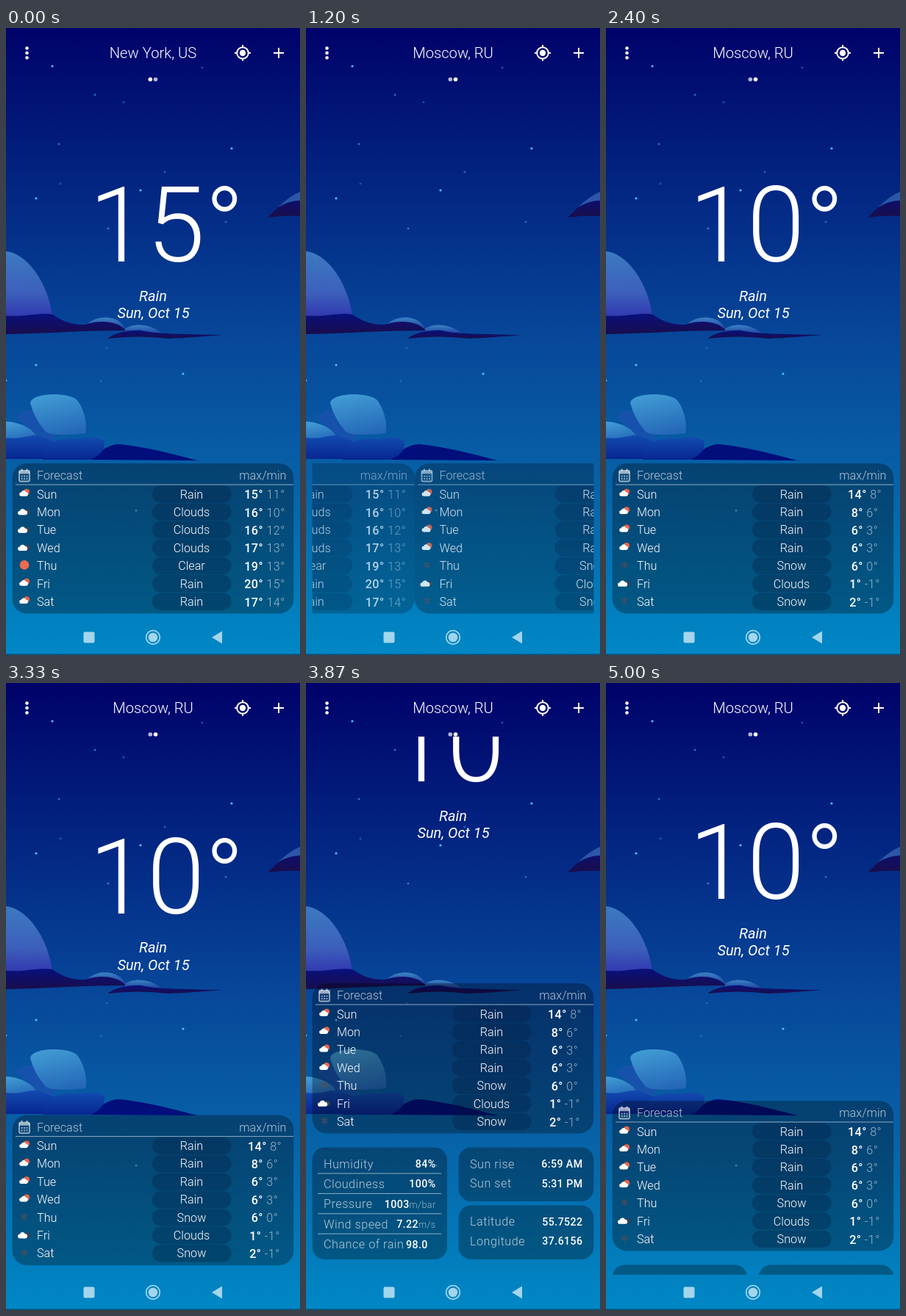
Write an HTML page that moves like this. It is 400 px wide and 854 px high and loops after 5.27 s.

```html
<!DOCTYPE html>
<html lang="en">
<head>
<meta charset="utf-8">
<title>Weather</title>
<style>
  html, body { margin: 0; width: 100%; height: 100%; overflow: hidden; background: #00026a; }
  svg { display: block; width: 400px; height: 854px; }
  text { font: 300 16.2px Roboto, sans-serif; fill: #fff; white-space: pre; }
  .mid { text-anchor: middle; }
  .end { text-anchor: end; }
  .soft { fill-opacity: .7; }
  .dim { font-weight: 300; fill-opacity: .6; }
  .title { font-size: 20.2px; }
  .temp { font-size: 142px; }
  .note { font-size: 20px; font-weight: 400; font-style: italic; }
  .range { font-weight: 500; letter-spacing: .4px; }
  .label { letter-spacing: .5px; fill-opacity: .7; }
  .value { font-size: 14.2px; font-weight: 500; letter-spacing: .4px; }
  .unit { font-size: 12.5px; }
  .panel { fill: #000; fill-opacity: .3; }
  .chip { fill: #001838; fill-opacity: .28; }
  .rule { stroke: #fff; stroke-opacity: .55; }
</style>
</head>
<body>
<svg viewBox="0 0 400 854">
  <defs>
    <linearGradient id="sky" x2="0" y2="1">
      <stop stop-color="#00026a"/>
      <stop offset=".22" stop-color="#02217f"/>
      <stop offset=".5" stop-color="#07489a"/>
      <stop offset=".75" stop-color="#0765a9"/>
      <stop offset="1" stop-color="#0088c6"/>
    </linearGradient>
    <linearGradient id="dome" x2="0" y2="1">
      <stop stop-color="#3c7ac0"/>
      <stop offset=".65" stop-color="#3c5fbc"/>
      <stop offset="1" stop-color="#323ab0"/>
    </linearGradient>
    <linearGradient id="bank" x2="0" y2="1">
      <stop stop-color="#08107c"/><stop offset="1" stop-color="#190d4c"/>
    </linearGradient>
    <linearGradient id="puff" x2="0" y2="1">
      <stop stop-color="#3c83c4"/><stop offset="1" stop-color="#1b3d9e"/>
    </linearGradient>
    <linearGradient id="rock" x1=".3" x2=".6" y2="1">
      <stop stop-color="#419bd4"/><stop offset="1" stop-color="#2468b8"/>
    </linearGradient>
    <linearGradient id="stone" x2="0" y2="1">
      <stop stop-color="#124bb0"/><stop offset="1" stop-color="#062690"/>
    </linearGradient>
    <clipPath id="view"><rect y="73" width="400" height="733"/></clipPath>
    <clipPath id="pager"><rect x="8.500" y="590" width="383" height="210"/></clipPath>
    <clipPath id="noteBox"><rect x="180.5" y="345" width="39.5" height="30"/></clipPath>
    <clipPath id="dateBox"><rect x="149" y="373" width="103" height="30"/></clipPath>

    <path id="cloudShape" d="M20 5a3.3 3.3 0 0 1-.3-6.6a4.6 4.6 0 0 1 8.5-.7a3.7 3.7 0 0 1 .8 7.3z" fill="#fff"/>
    <g id="rain">
      <circle cx="28" cy="-2" r="4" fill="#e8674c"/>
      <use href="#cloudShape" transform="translate(5.2 0) scale(.78)"/>
    </g>
    <g id="cloud">
      <circle cx="29" cy=".8" r="3.7" fill="#3d4452"/>
      <use href="#cloudShape" transform="translate(2 .8) scale(.85)"/>
    </g>
    <circle id="clear" cx="25" r="6.3" fill="#ee6c4d"/>
    <g id="snow" stroke="#5a4c55" stroke-opacity=".65" stroke-width="2" stroke-linecap="round">
      <path d="M25-4v8M21.5-2l7 4M28.5-2l-7 4"/>
    </g>
    <g id="calendar" fill="none" stroke="#fff" stroke-opacity=".6">
      <rect x="18" y="603" width="14" height="14.5" rx="1.5" stroke-width="1.8"/>
      <path d="M18 605.5h14" stroke-width="3.5"/>
      <path d="M21.5 600.5v3M28.5 600.5v3" stroke-width="2"/>
      <path d="M20.7 610.5h9M20.7 614h9" stroke-width="2" stroke-dasharray="2 1.4"/>
    </g>
  </defs>

  <rect width="400" height="854" fill="url(#sky)"/>
  <g id="stars" fill="#4cc6ea"></g>

  <path d="M356 258Q376 237 400 222V256Q380 255 356 258Z" fill="url(#bank)"/>
  <path d="M370 244Q386 229 400 223V235Q386 235 370 244Z" fill="#2c57a8"/>

  <path d="M0 304C29 307 57 347 63 392H0Z" fill="url(#dome)"/>
  <path d="M110 404C122 390 155 390 163 411L140 411Z" fill="url(#puff)"/>
  <path d="M160 411C174 400 198 404 212 416L165 417Z" fill="url(#puff)"/>
  <path d="M0 392C24 394 46 387 63 390C76 399 90 405 108 404C128 397 152 399 163 412Q120 412 82 414T0 417Z" fill="url(#bank)"/>
  <path d="M138 423C150 414 168 411 185 412C202 417 250 417 294 418Q250 422 222 423Q180 418 138 423Z" fill="url(#bank)"/>

  <path d="M14 530C21 521 30 520 38 521L68 555L60 568L42 556Z" fill="#1652ac"/>
  <path d="M33 511C35 496 84 496 96 506C108 520 111 544 108 552C94 553 68 557 54 550Q38 531 33 511Z" fill="url(#rock)"/>
  <path d="M0 536C20 537 37 546 42 558L0 562Z" fill="url(#rock)"/>
  <path d="M0 558C20 561 32 553 44 555L64 563L50 587H0Z" fill="url(#stone)"/>
  <path d="M115 588Q137 566 155 567C190 571 224 579 260 589Z" fill="#020e7c"/>
  <path d="M49 580C54 562 76 558 96 560C112 557 130 556 134 564C135 576 124 586 112 588H50Z" fill="url(#stone)"/>

  <g clip-path="url(#view)">
    <g id="scroller">
      <g id="hero">
        <text id="temp" class="temp" x="113" y="318"></text>
        <g clip-path="url(#noteBox)"><text id="note" class="note mid" x="200" y="371.5">Rain</text></g>
        <g clip-path="url(#dateBox)"><text id="date" class="note mid" x="200.5" y="395">Sun, Oct 15</text></g>
      </g>
      <g clip-path="url(#pager)"><g id="pages"></g></g>
      <g id="details"></g>
    </g>
  </g>

  <g fill="#fff">
    <circle cx="28.5" cy="27.5" r="2.3"/><circle cx="28.5" cy="34" r="2.3"/><circle cx="28.5" cy="40.5" r="2.3"/>
    <circle id="dot0" cx="196.3" cy="70" r="2.8"/><circle id="dot1" cx="203.5" cy="70" r="2.8"/>
    <circle cx="322" cy="34" r="4.2"/>
  </g>
  <g fill="none" stroke="#fff" stroke-width="2">
    <circle cx="322" cy="34" r="7.8"/>
    <path d="M322 23v3.5M322 41.5v3.5M311 34h3.5M329.5 34h3.5M364 34h14M371 27v14"/>
  </g>
  <text id="city" class="title mid" x="200" y="41"></text>

  <g fill="#a3d6ec">
    <rect x="105.5" y="822.5" width="15" height="15" rx="2"/>
    <circle cx="200" cy="830" r="6.3"/>
    <circle cx="200" cy="830" r="9.3" fill="none" stroke="#a3d6ec" stroke-width="1.7"/>
    <path d="M280 830L294 821.5V838.5Z"/>
  </g>
  <rect y="852.5" width="400" height="1.5" fill="#06517c"/>
</svg>

<script>
const LOOP = 5270, PAGE_WIDTH = 383, SELECT_TIME = 1160, ENTER_TIME = 1000;
const DAYS = ['Sun', 'Mon', 'Tue', 'Wed', 'Thu', 'Fri', 'Sat'];
const CITIES = [
  { name: 'New York, US', temp: '15°',
    sky: ['Rain', 'Clouds', 'Clouds', 'Clouds', 'Clear', 'Rain', 'Rain'],
    max: [15, 16, 16, 17, 19, 20, 17], min: [11, 10, 12, 13, 13, 15, 14] },
  { name: 'Moscow, RU', temp: '10°',
    sky: ['Rain', 'Rain', 'Rain', 'Rain', 'Snow', 'Clouds', 'Snow'],
    max: [14, 8, 6, 6, 6, 1, 2], min: [8, 6, 3, 3, 0, -1, -1] }
];
const ICONS = { Rain: 'rain', Clouds: 'cloud', Clear: 'clear', Snow: 'snow' };

// x, y, brightness
const STARS = [
  [63, 52, 1], [267, 54, .35], [121, 91, .5], [160, 101, .35], [72, 158, .5], [307, 164, 1],
  [216, 196, .4], [74, 212, .3], [183, 221, 1], [41, 232, 1], [299, 264, .4], [139, 273, .5],
  [137, 436, .25], [41, 459, 1], [241, 471, 1], [0, 480, .8], [129, 481, .25], [177, 657, .8]
];

const PAGER_KEYS = [[440, 0], [800, 120], [1530, 323], [1990, 383]];
const SCROLL_KEYS = [[3290, 0], [3600, 121], [3870, 184], [4200, 184], [4860, 24]];

const el = id => document.getElementById(id);
const text = (x, y, cls, content) => `<text x="${x}" y="${y}" class="${cls}">${content}</text>`;
const box = (x, y, w, h, r, cls) => `<rect x="${x}" y="${y}" width="${w}" height="${h}" rx="${r}" class="${cls}"/>`;
const rule = (x1, x2, y) => `<path d="M${x1} ${y}H${x2}" class="rule"/>`;

function forecastPage(city, index) {
  const rows = DAYS.map((day, i) => {
    const y = 634.8 + i * 24.4, base = y + 5.7;
    const sky = city.sky[i];
    return `<use href="#${ICONS[sky]}" y="${y - 1}"/>` +
      text(42, base, '', day) +
      box(199, y - 11.8, 107.5, 23.6, 11.8, 'chip') +
      text(252.5, base, 'mid', sky) +
      text(352, base + .6, 'range mid', `${city.max[i]}° <tspan class="dim">${city.min[i]}°</tspan>`);
  });
  return `<g transform="translate(${index * PAGE_WIDTH})">` +
    box(8.5, 593, 383, 204.5, 20, 'panel') +
    '<use href="#calendar"/>' +
    text(42, 615, 'soft', 'Forecast') + text(381.5, 615, 'soft end', 'max/min') +
    rule(13, 391, 622) + rows.join('') + '</g>';
}

function detailCards() {
  const left = [['Humidity', '84%'], ['Cloudiness', '100%'], ['Pressure', '1003', 'm/bar'],
    ['Wind speed', '7.22', 'm/s'], ['Chance of rain', '98.0']];
  const right = [['Sun rise', '6:59 AM', 844.5], ['Sun set', '5:31 PM', 871],
    ['Latitude', '55.7522', 923], ['Longitude', '37.6156', 949.5]];
  let out = box(8.5, 816.5, 183.5, 152.5, 17, 'panel') +
    box(207.5, 816.5, 184, 73.5, 17, 'panel') + box(207.5, 895.5, 184, 73.5, 17, 'panel');
  left.forEach(([label, value, unit = ''], i) => {
    const y = 844.5 + i * 27.4, last = i === left.length - 1;
    out += text(24, y, 'label', label) +
      text(last ? 136 : 176.5, y - .5, last ? 'value' : 'value end',
        value + (unit && `<tspan class="dim unit">${unit}</tspan>`));
    if (!last) out += rule(16, 184, y + 7.5);
  });
  for (const [label, value, y] of right) {
    out += text(223, y, 'label', label) + text(376.5, y - .5, 'value end', value);
  }
  return out;
}

// Monotone cubic interpolation through [time, value] keys, resting at both ends.
function follow(keys, t) {
  const last = keys.length - 1;
  if (t <= keys[0][0]) return keys[0][1];
  if (t >= keys[last][0]) return keys[last][1];
  const secant = i => (keys[i + 1][1] - keys[i][1]) / (keys[i + 1][0] - keys[i][0]);
  const slope = i => {
    if (i === 0 || i === last) return 0;
    const a = secant(i - 1), b = secant(i);
    return a * b > 0 ? 2 * a * b / (a + b) : 0;
  };
  const i = keys.findIndex(key => key[0] > t) - 1;
  const [t0, v0] = keys[i], [t1, v1] = keys[i + 1];
  const span = t1 - t0, u = (t - t0) / span, w = 1 - u;
  return v0 * (1 + 2 * u) * w * w + v1 * (3 - 2 * u) * u * u +
    span * u * w * (slope(i) * w - slope(i + 1) * u);
}

const shift = (id, x, y) => el(id).setAttribute('transform', `translate(${x} ${y})`);

function render(t) {
  const page = t < SELECT_TIME ? 0 : 1;
  const city = CITIES[page];
  el('city').textContent = city.name;
  el('temp').textContent = city.temp;
  el('dot0').setAttribute('opacity', page ? .7 : 1);
  el('dot1').setAttribute('opacity', page ? 1 : .7);

  const progress = page ? Math.min(1, (t - SELECT_TIME) / ENTER_TIME) : 1;
  const eased = (1 - Math.cos(Math.PI * progress)) / 2;
  const away = 1 - eased;
  el('hero').setAttribute('opacity', eased);
  shift('temp', 0, -35 * away);
  shift('note', -7.6 * away, 0);
  shift('date', 20 * away, 0);

  // Pages fade to half strength as they leave the centre.
  const offset = follow(PAGER_KEYS, t);
  shift('pages', -offset, 0);
  [...el('pages').children].forEach((node, i) =>
    node.setAttribute('opacity', 1 - .5 * Math.abs(i - offset / PAGE_WIDTH)));
  shift('scroller', 0, -follow(SCROLL_KEYS, t));
}

el('stars').innerHTML = STARS.map(([x, y, glow]) =>
  `<circle cx="${x}" cy="${y}" r="1.6" opacity="${glow}"/>`).join('');
el('pages').innerHTML = CITIES.map(forecastPage).join('');
el('details').innerHTML = detailCards();

function tick() {
  render(performance.now() % LOOP);
  requestAnimationFrame(tick);
}
tick();
</script>
</body>
</html>
```
